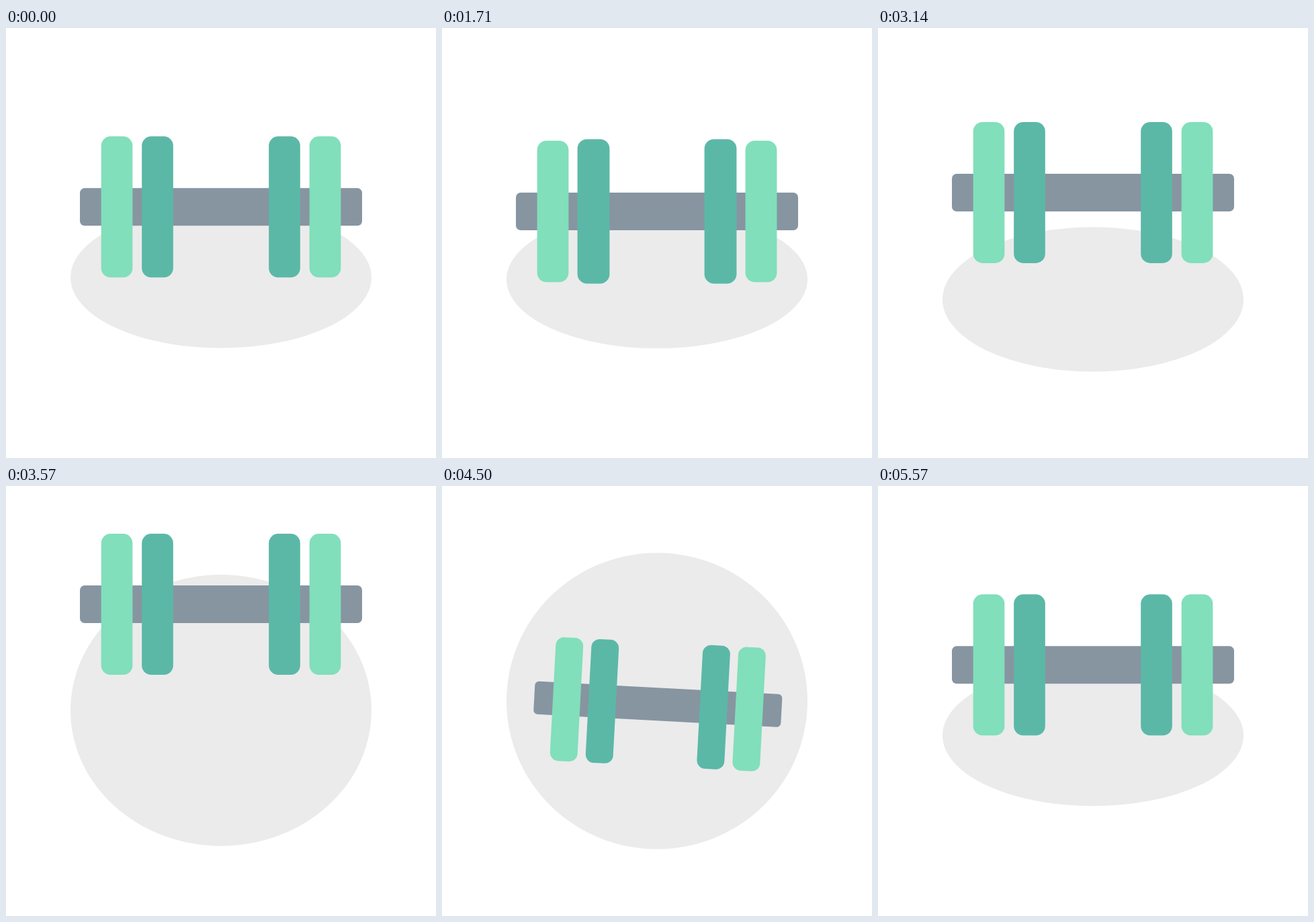
These frames come from a looping animation (640x640 px, 6000 ms). An HTML page:

```html
<!DOCTYPE html>
<html lang="en">
<head>
<meta charset="utf-8">
<title>Dumbbell</title>
<style>
  html, body { margin: 0; width: 100%; height: 100%; overflow: hidden; background: #fff; }
  svg { display: block; width: 100%; height: 100%; }
  .bar { fill: #8795a1; }
  .light { fill: #81dfbb; }
  .dark { fill: #5bb8a7; }
</style>
</head>
<body>
<svg viewBox="0 0 640 640">
  <ellipse id="shadow" cx="320" rx="224" fill="#ebebeb"/>
  <g id="dumbbell">
    <rect class="bar" x="-210" y="-56" width="420" height="56" rx="7"/>
  </g>
</svg>
<script>
const LOOP = 6000, FPS = 14;
const PIVOT = 294.33, LIFT = 28; // the dumbbell's middle sits above its pivot
const FLOOR = 371.33;

const shadow = document.getElementById('shadow');
const dumbbell = document.getElementById('dumbbell');

function addPlate(kind, x, delay) {
  const el = document.createElementNS('http://www.w3.org/2000/svg', 'rect');
  const attrs = { class: kind, x: -23.33, y: -105, width: 46.67, height: 210, rx: 14 };
  for (const name in attrs) el.setAttribute(name, attrs[name]);
  dumbbell.append(el);
  return { el, x, delay };
}

const plates = [-1, 1].flatMap(side => [
  addPlate('light', side * 155, .12),
  addPlate('dark', side * 94.5, .35)
]);

// Eased progress from 0 to 1 between two moments in seconds
function go(t, start, end) {
  const u = Math.min(1, Math.max(0, (t - start) / (end - start)));
  return u < .5 ? 2 * u * u : 1 - 2 * (1 - u) ** 2;
}

// Shrink, swell and settle: 0, -1, 1, 0
const breath = t => 2 * go(t, .42, 1.22) - go(t, 0, .42) - go(t, 1.22, 1.7);

function draw(t) {
  const fall = go(t, 3.6, 4.6), back = go(t, 4.7, 5.42);

  const y = 87 * go(t, 1.517, 2.526) - 177.3 * go(t, 2.69, 3.5)
    + 148.3 * fall - 67 * back + 9 * go(t, 5.42, 5.56);
  const turn = 13 * go(t, 4.1, 4.75) - 6.1 * go(t, 3.6, 4.1) - 6.9 * go(t, 4.75, 5.35);
  const scale = 1 + .07 * breath(t) - .125 * (fall - back);
  dumbbell.setAttribute('transform',
    `translate(320 ${PIVOT + y}) rotate(${turn}) scale(${scale})`);

  for (const { el, x, delay } of plates)
    el.setAttribute('transform',
      `translate(${x} ${-LIFT}) scale(${1 + .03 * breath(t - delay)})`);

  const flatten = go(t, 1.6, 2.5), open = go(t, 2.57, 3.86);
  shadow.setAttribute('cy', FLOOR + 87.2 * flatten - 138.5 * open + 51.3 * go(t, 4.74, 5.5));
  shadow.setAttribute('ry', 105 - 71 * flatten + 186.5 * open - 115.5 * go(t, 4.53, 5.57));
}

const start = performance.now();
function tick() {
  const ms = (performance.now() - start) % LOOP;
  draw(Math.floor((ms + 4) * FPS / 1000) / FPS % (LOOP / 1000));
  requestAnimationFrame(tick);
}
tick();
</script>
</body>
</html>
```
